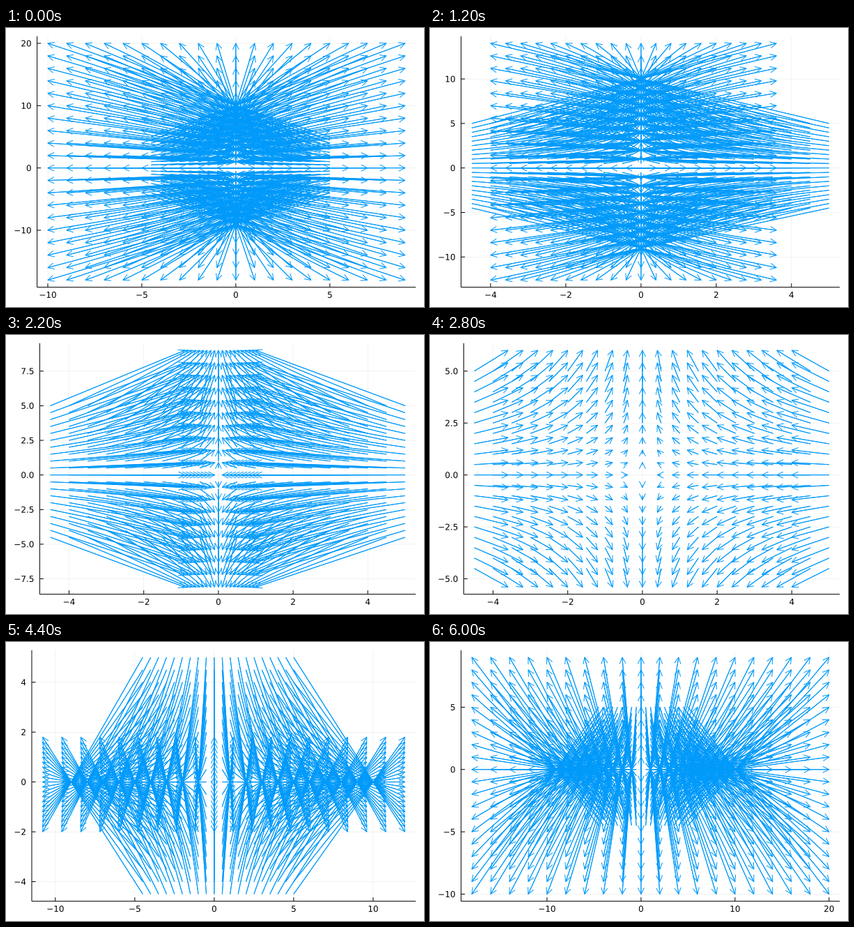
Animation, 600 px wide and 400 px high, one loop 6.2 s. Source, as a matplotlib script:

```python
import numpy as np
import matplotlib.pyplot as plt
from matplotlib.animation import FuncAnimation
from matplotlib.collections import LineCollection
from matplotlib.patches import PathPatch
from matplotlib.textpath import TextPath
from matplotlib.transforms import Affine2D

W, H, DPI = 600, 400, 100
TOP, RIGHT, BOTTOM = 11.81, 588.19, 371.65
BLUE = (0, 154 / 255, 250 / 255)
FONT = 12
TICK = 5.5
HEAD, HALF = 9, 4.5
FRAMES, INTERVAL = 31, 200
PX = 72 / DPI

side = np.arange(-9, 11) / 2
X, Y = (g.ravel() for g in np.meshgrid(side, side))

plt.rcParams["font.family"] = "DejaVu Sans"
fig = plt.figure(figsize=(W / DPI, H / DPI), dpi=DPI, facecolor="white")
ax = fig.add_axes([0, 0, 1, 1])


def limits(*values):
    v = np.concatenate(values)
    pad = 0.03 * (v.max() - v.min())
    return v.min() - pad, v.max() + pad


def ticks(lo, hi):
    """Pick 4 to 8 ticks by weighing count, coverage and niceness."""
    nice = {1: 1.0, 5: 0.9, 2: 0.7, 2.5: 0.5, 3: 0.2}
    steps = [(q * 10.0**z, s) for z in (-1, 0, 1) for q, s in nice.items()]
    best, found, top = None, 1, -np.inf
    for step, score in sorted(steps, reverse=True):
        n = np.arange(np.ceil(lo / step), np.floor(hi / step) + 1)
        if not 4 <= len(n) <= 8:
            continue
        count = 1 - abs(len(n) - 5) / 5
        cover = 1.5 * (hi - lo) / ((len(n) - 1) * step)
        total = count / 4 + cover / 3 + score / 4
        if total > top + 1e-9:
            best, found, top = n * step, step, total
    digits = 0 if found == int(found) else 1
    return best, [f"{v + 0:.{digits}f}".replace("-", "\u2212") for v in best]


def advance(s):
    return FONT * sum({"\u2212": 0.838, ".": 0.318}.get(c, 0.636) for c in s)


def label(s, x, base):
    move = Affine2D().scale(1, -1).translate(x, base)
    path = TextPath((0, 0), s, size=FONT).transformed(move)
    ax.add_patch(PathPatch(path, fc="black", lw=0, snap=False))


def lines(segs, color, px=1.0, alpha=1.0):
    c = LineCollection(segs, colors=[color], linewidths=px * PX, alpha=alpha)
    c.set_snap(False)
    ax.add_collection(c, autolim=False)


def draw(i):
    ax.cla()
    ax.axis("off")
    ax.set_xlim(0, W)
    ax.set_ylim(H, 0)

    a = (i - 15) / 5
    U, V = X * (1 + a), Y * (1 - a)
    (x0, x1), (y0, y1) = limits(X, U), limits(Y, V)
    xt, xs = ticks(x0, x1)
    yt, ys = ticks(y0, y1)
    left = 19.3 + max(map(advance, ys))

    def px(x):
        return left + (x - x0) / (x1 - x0) * (RIGHT - left)

    def py(y):
        return BOTTOM - (y - y0) / (y1 - y0) * (BOTTOM - TOP)

    gx, gy = px(xt), py(yt)
    lines([[(x, TOP), (x, BOTTOM)] for x in gx]
          + [[(left, y), (RIGHT, y)] for y in gy], "black", 0.5, 0.1)
    lines([[(left, BOTTOM), (RIGHT, BOTTOM)], [(left, TOP), (left, BOTTOM)]]
          + [[(x, BOTTOM), (x, BOTTOM - TICK)] for x in gx]
          + [[(left, y), (left + TICK, y)] for y in gy], "black")
    for x, s in zip(gx, xs):
        label(s, x - advance(s) / 2, 386.8)
    for y, s in zip(gy, ys):
        label(s, left - 8 - advance(s), y + 4.4)

    start = np.column_stack([px(X), py(Y)])
    tip = np.column_stack([px(U), py(V)])
    size = np.hypot(*(tip - start).T)
    keep = size > 1e-6
    start, tip = start[keep], tip[keep]
    if not len(tip):
        return
    d = (tip - start) / size[keep, None]
    n = np.column_stack([-d[:, 1], d[:, 0]])
    back = tip - HEAD * d
    shafts = np.stack([start, tip], axis=1)
    heads = np.stack([back + HALF * n, tip, back - HALF * n], axis=1)
    # shafts are stroked twice, which makes them heavier than the heads
    for part in (shafts, shafts, heads):
        lines(part, BLUE)


anim = FuncAnimation(fig, draw, frames=FRAMES, init_func=lambda: draw(0),
                     interval=INTERVAL, repeat=True, repeat_delay=0)
plt.show()
```
